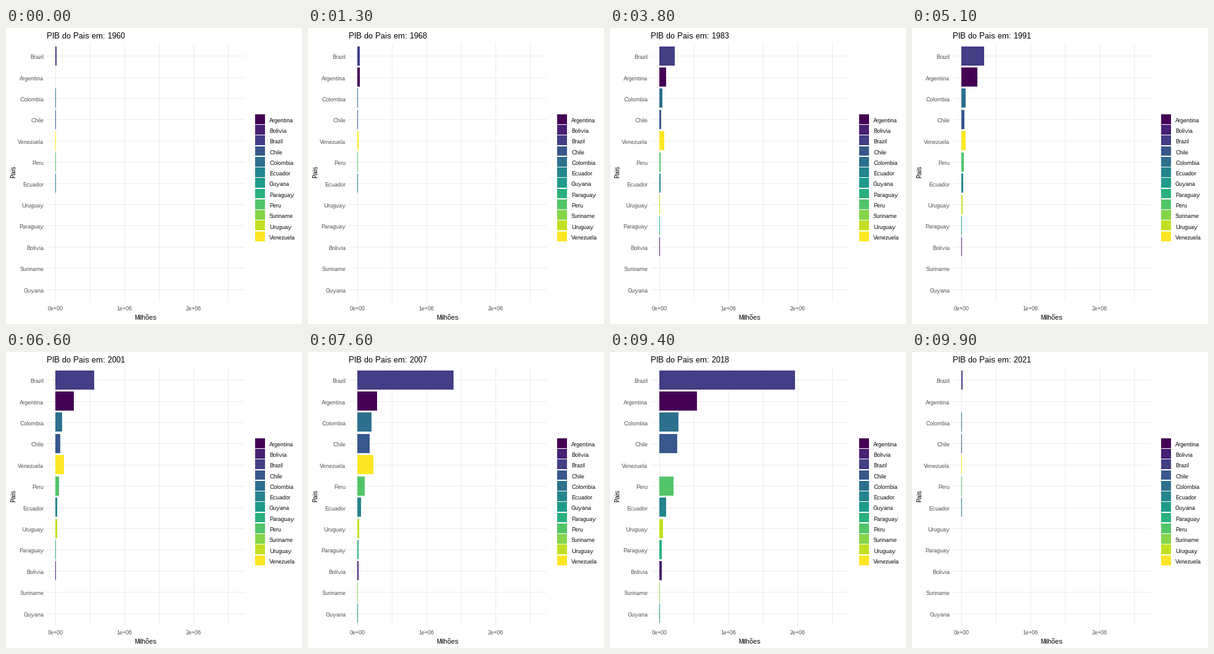
Write a matplotlib script that moves like this. It is 480x480 px and loops after 10 s.

```python
import numpy as np
import matplotlib.pyplot as plt
from matplotlib.animation import FuncAnimation
from matplotlib.patches import Rectangle

plt.rcParams.update({
    "font.family": "Liberation Sans",
    "text.hinting": "native",
    "text.hinting_factor": 1,
})

SIZE, DPI = 480, 80
FRAMES, INTERVAL = 100, 100
FIRST, LAST = 1960, 2021
DATA_FRAMES = 98                # the bars start over once the data ends
ZERO, SCALE = 80.278, 0.1118    # px, px per billion
ROW0, ROW_STEP = 45.1, 34.42
BAR_HALF = 0.45 * ROW_STEP
KEY0, KEY_STEP, KEY_HALF = 147.61, 17.28, 7.92
LEFT, RIGHT, TOP, BOTTOM = 66, 387, 24, 444
GRID, TICK = "#EBEBEB", "#4D4D4D"


def track(turns):
    """GDP per frame: steady yearly growth between turning points,
    and an even move between the frames that open each year."""
    known = sorted(turns)
    years = np.arange(known[0], known[-1] + 1)
    values = np.exp(np.interp(years, known, np.log([turns[y] for y in known])))
    keys = np.floor((FRAMES - 1) * (years - FIRST) / (LAST - FIRST))
    return np.interp(np.arange(DATA_FRAMES), keys, values, left=0, right=0)


# Turning points of each economy, in billions
gdp = {
    "Brazil": track({
        1960: 15.2, 1965: 21.8, 1970: 42, 1975: 129, 1982: 282, 1983: 203,
        1988: 330, 1992: 328, 1995: 770, 1998: 864, 1999: 600, 2002: 510,
        2001: 560, 2007: 1397, 2009: 1667, 2011: 2616, 2014: 2456, 2015: 1802,
        2017: 2063, 2019: 1878, 2020: 1449}),
    "Argentina": track({
        1962: 24.5, 1970: 31.6, 1975: 52.4, 1988: 126, 1989: 77, 1992: 229,
        2001: 269, 2002: 98, 2007: 287.5, 2011: 530, 2014: 526, 2017: 644,
        2020: 389}),
    "Colombia": track({
        1960: 4, 1975: 13.1, 1982: 39, 1992: 58, 2001: 98, 2003: 95,
        2007: 206, 2011: 335, 2014: 381, 2015: 293, 2020: 270}),
    "Chile": track({
        1960: 4.1, 1975: 7.6, 1981: 34.5, 1985: 17.7, 1992: 46, 2001: 71,
        2007: 173.6, 2011: 252, 2014: 260, 2020: 253}),
    "Venezuela": track({
        1960: 7.8, 1975: 27.5, 1982: 80, 1989: 43.5, 1992: 60.4, 2001: 123,
        2003: 84, 2007: 230, 2010: 393, 2011: 316, 2014: 482}),
    "Peru": track({
        1960: 2.6, 1975: 16.9, 1988: 15.4, 1992: 36, 2001: 52, 2007: 102,
        2013: 201, 2020: 202}),
    "Ecuador": track({
        1960: 2.07, 1961: 2, 1962: 1.5, 1969: 2.1, 1980: 17.9, 2001: 24.5,
        2007: 51, 2014: 101.7, 2020: 98.8}),
    "Uruguay": track({
        1960: 1.24, 1968: 1.6, 1992: 12.9, 2001: 21, 2004: 13.7, 2014: 57,
        2020: 53.6}),
    "Paraguay": track({
        1965: 0.44, 1977: 2.1, 1992: 8, 2005: 10.7, 2011: 34, 2020: 38}),
    "Bolivia": track({1960: 0.56, 1974: 2.1, 2005: 9.5, 2014: 33, 2020: 36.6}),
    "Suriname": track({1960: 0.1, 2005: 1.8, 2020: 4}),
    "Guyana": track({1960: 0.17, 2006: 1.9, 2020: 5.5}),
}

names = sorted(gdp)
colors = dict(zip(names, plt.get_cmap("viridis")(np.linspace(0, 1, len(names)))))

fig = plt.figure(figsize=(SIZE / DPI, SIZE / DPI), dpi=DPI, facecolor="white")
ax = fig.add_axes([0, 0, 1, 1])
ax.set_xlim(0, SIZE)
ax.set_ylim(SIZE, 0)
ax.axis("off")


def box(x0, y0, x1, y1, color, z=1):
    patch = Rectangle((x0, y0), x1 - x0, y1 - y0, fc=color, lw=0,
                      antialiased=False, zorder=z)
    return ax.add_patch(patch)


def label(x, y, text, px=9, color="black", ha="left", va="baseline", **kw):
    return ax.text(x, y, text, fontsize=px * 72 / DPI, color=color,
                   ha=ha, va=va, **kw)


for k in range(6):
    x = round(ZERO + 500 * k * SCALE)
    box(x, TOP, x + 1, BOTTOM, GRID)
    if k % 2 == 0:
        label(x - 0.2, 458, f"{k // 2}e+{'06' if k else '00'}",
              color=TICK, ha="center")

bars = {}
for k, name in enumerate(gdp):
    y = ROW0 + ROW_STEP * k
    box(LEFT, round(y), RIGHT, round(y) + 1, GRID)
    bars[name] = box(80, round(y - BAR_HALF), 80, round(y + BAR_HALF),
                     colors[name], z=2)
    label(61.3, round(y + 5), name, color=TICK, ha="right")

for k, name in enumerate(names):
    y = KEY0 + KEY_STEP * k
    box(404, round(y - KEY_HALF), 420, round(y + KEY_HALF), colors[name])
    label(427, round(y + 5.2), name)

label(226, 473, "Milhões", 11, ha="center")
label(17, 233, "Pais", 11, ha="right", va="center", rotation=90)
title = label(66, 17, "", 13)


def draw(i):
    year = round(FIRST + (LAST - FIRST) * i / (FRAMES - 1))
    title.set_text(f"PIB do Pais em: {year}")
    for name, bar in bars.items():
        edge = round(ZERO + SCALE * gdp[name][i % DATA_FRAMES])
        bar.set_width(edge - 80)
        bar.set_visible(edge > 80)
    return [title, *bars.values()]


anim = FuncAnimation(fig, draw, frames=FRAMES, interval=INTERVAL,
                     repeat=True, repeat_delay=0, blit=False)
plt.show()
```
